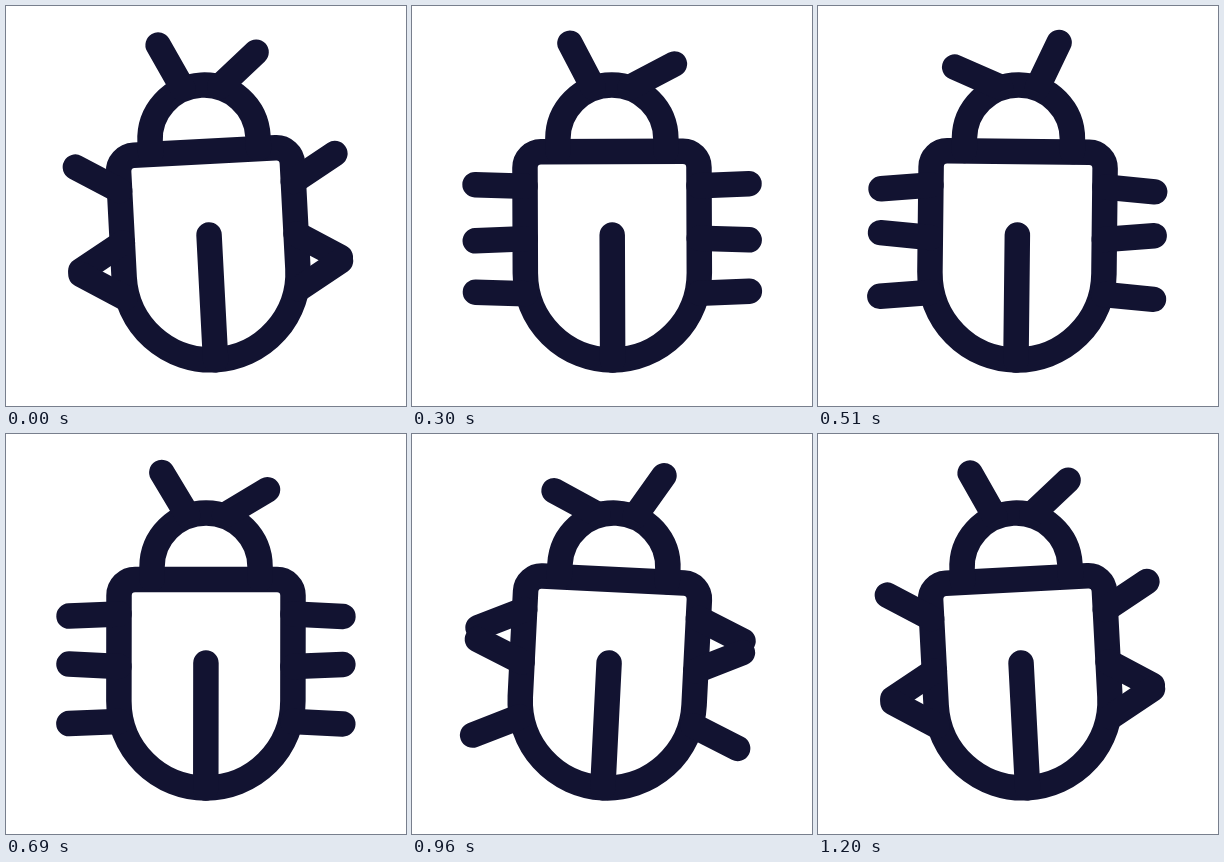
Recreate the animation shown at these times as an HTML page. Size 400x400 px, loop 1.26 s.

```html
<!DOCTYPE html>
<html lang="en">
<head>
<meta charset="utf-8">
<title>Bug</title>
<style>
  html, body { margin: 0; width: 100%; height: 100%; overflow: hidden; background: #fff; }
  svg { display: block; width: 100vw; height: 100vh; }
</style>
</head>
<body>
<svg viewBox="0 0 400 400">
  <g id="bug" fill="none" stroke="#121331" stroke-width="25.5" stroke-linecap="round" stroke-linejoin="round">
    <path d="M129 145.5H271A16 16 0 0 1 287 161.5V267A87 87 0 0 1 113 267V161.5A16 16 0 0 1 129 145.5Z"/>
    <path d="M146 145V133A54 54 0 0 1 254 133V145"/>
    <path d="M200 229V354"/>
  </g>
</svg>
<script>
const LOOP = 1260, STEP = 30, LAST = 1200, CYCLE = 400;
const LEG_SWING = 30;
const { sin, cos, PI } = Math;
const bug = document.getElementById('bug');

function addLine(x, y, dx) {
  const el = document.createElementNS('http://www.w3.org/2000/svg', 'path');
  el.setAttribute('d', `M${x} ${y}h${dx}`);
  bug.appendChild(el);
  return { turn: deg => el.setAttribute('transform', `rotate(${deg.toFixed(3)} ${x} ${y})`) };
}

// Periodic motion: a mean plus first and second harmonics.
const wave = (mean, c1, s1, c2, s2) => a =>
  mean + c1 * cos(a) + s1 * sin(a) + c2 * cos(2 * a) + s2 * sin(2 * a);

const tilt = wave(-0.1, -2.9, 0.1, 0, -0.6);
const swing = wave(0.03, 1, -0.04, 0, 0);
const liftL = wave(45.6, 15.5, -19.2, 2.3, -3.3);
const liftR = wave(47, -6.5, 19.3, 0, 6.5);

// Neighbouring legs swing in opposite directions.
const legs = [180, 232.5, 287.5].map((y, i) => ({
  left: addLine(113, y, -50),
  right: addLine(287, y, 50),
  dir: i % 2 ? -1 : 1
}));
const feelerL = addLine(181.5, 81.4, -50);
const feelerR = addLine(218.5, 81.4, 50);

function draw(t) {
  const a = 2 * PI * t / CYCLE;
  bug.setAttribute('transform', `rotate(${tilt(a).toFixed(3)} 200 171)`);

  for (const { left, right, dir } of legs) {
    const deg = LEG_SWING * swing(a) * dir;
    left.turn(deg);
    right.turn(-deg);
  }

  feelerL.turn(liftL(a));
  feelerR.turn(-liftR(a));
}

const start = performance.now();
function tick() {
  const t = (performance.now() - start) % LOOP;
  draw(Math.min(LAST, Math.floor(t / STEP) * STEP));
  requestAnimationFrame(tick);
}
tick();
</script>
</body>
</html>
```
